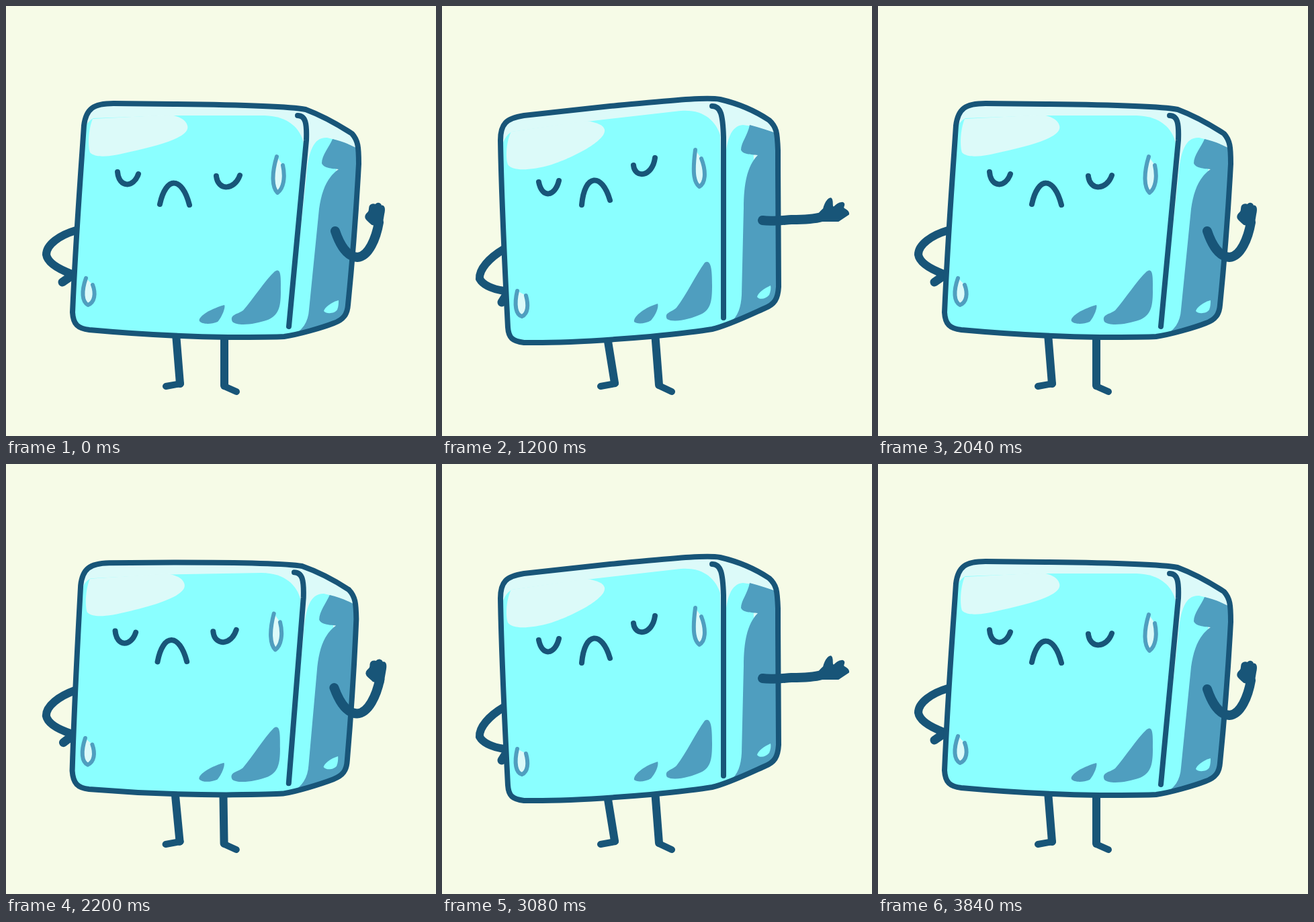
These frames come from a looping animation (640 px wide and 640 px high, 3.88 s). An HTML page:

```html
<!DOCTYPE html>
<html lang="en">
<head>
<meta charset="utf-8">
<title>Sulking ice cube</title>
<style>
  html, body { margin: 0; width: 100%; height: 100%; overflow: hidden; background: #f6fbe7; }
  svg { display: block; width: 100vw; height: 100vh; }
</style>
</head>
<body>
<svg id="stage" viewBox="0 0 640 640">
  <defs><clipPath id="inside"><path id="clipShape"/></clipPath></defs>
</svg>
<script>
const LOOP = 3880, STEP = 40;
const INK = '#185578', ICE = '#8affff', PALE = '#dcfaf9', SHADE = '#4f9ebf';
const MID = 0.77; // lean at which a three-key part reaches its middle key

// Keys run from upright to leaning, with an optional middle key
const BODY = [
  'M99 456 C100 474 107 480 124 482 C190 488 260 492 330 493 C370 493 400 493 414 492 C435 489 470 479 488 472 C502 467 508 459 509 445 C513 405 521 310 525 235 C525 210 524 200 515 190 C495 177 470 163 446 154 C420 149 340 147 250 146 L160 145 C130 145 119 153 116 178 C112 240 104 340 99 456Z',
  'M97 460 C99 482 106 490 122 492 C185 495 250 494 320 490 C355 488 385 487 404 485 C428 480 461 466 484 458 C498 452 503 446 503 428 C505 375 507 295 507 215 C505 196 504 186 492 176 C470 161 444 150 420 144 C395 141 335 144 250 148 L128 156 C101 159 93 169 92 192 C92 250 94 360 97 460Z',
  'M98 478 C99 494 105 499 122 501 C180 502 240 498 310 492 C350 488 385 484 402 481 C425 476 460 459 480 450 C495 444 500 436 501 418 C501 370 500 290 500 215 C499 188 498 180 487 170 C466 156 440 145 414 139 C390 135 330 142 250 149 L122 163 C95 167 87 176 87 200 C88 260 93 380 98 478Z'
];
const ARM = [
  'M490 335 C497 356 508 373 523 374 C540 373 551 345 555 322',
  'M482 325 C492 346 505 362 520 362 C538 362 553 342 562 315',
  'M477 319 C490 321 505 319 520 318 C540 318 555 317 565 314'
];
const FIST = [
  'M545 325 C540 320 533 317 536 311 C539 306 541 308 541 302 C541 294 547 295 550 296 C553 292 558 294 558 298 C563 296 564 302 562 310 L559 328Z',
  'M553 317 C549 310 539 308 540 302 C542 296 546 299 548 296 C546 288 551 285 555 286 C560 281 566 282 567 286 C575 284 575 290 574 300 L570 320Z',
  'M557 320 C557 308 560 307 561 304 C562 302 562 298 564 295 C563 287 569 285 573 288 C578 283 583 284 585 288 C592 286 592 292 592 316 L586 320Z'
];
const OPEN_HAND = 'M557 320 C558 310 564 306 568 302 C571 290 578 283 580 288 C582 294 579 299 583 300 C592 290 600 292 598 297 C594 304 606 302 605 310 L590 320Z';

const stage = document.getElementById('stage');
const clipShape = document.getElementById('clipShape');
const parts = [];

function addPath(attrs) {
  const el = document.createElementNS('http://www.w3.org/2000/svg', 'path');
  for (const name in attrs) el.setAttribute(name, attrs[name]);
  return stage.appendChild(el);
}

const line = (width, color = INK, fill = 'none') => ({
  fill, stroke: color, 'stroke-width': width, 'stroke-linecap': 'round', 'stroke-linejoin': 'round'
});
const filled = fill => ({ fill });
const inside = fill => ({ fill, 'clip-path': 'url(#inside)' });

function part(style, ...keys) {
  parts.push({ el: addPath(style), keys });
}

// Legs settle as soon as the cube reaches its middle pose
function leg(width, upright, leaning) {
  part(line(width), upright, leaning, leaning);
}

// Limbs behind the cube
part(line(12),
  'M104 334 C80 341 60 355 60 370 C62 383 82 393 98 399',
  'M94 350 C74 364 59 380 59 393 C63 406 80 409 94 411',
  'M92 362 C70 375 55 392 56 406 C62 417 80 422 92 424');
part(line(13), 'M97 402 L84 411', 'M96 421 L91 429', 'M94 433 L89 441');
leg(12, 'M253 488 L259 562', 'M246 493 L257 561');
leg(10, 'M260 562 L238 566', 'M258 562 L236 566');
leg(12, 'M325 488 L325 565', 'M317 486 L323 564');
leg(10, 'M325 566 L343 574', 'M323 565 L342 574');

// Cube faces
part(filled(PALE), ...BODY);
part(inside(ICE),
  'M80 500 L112 200 C116 183 120 172 130 167 L247 163 L385 163 C420 164 438 182 443 204 L421 510Z',
  'M80 515 L86 220 C90 202 95 192 104 187 L215 172 L355 156 C388 153 407 170 414 192 L419 500Z');
part(inside(ICE),
  'M419 510 L447 255 C450 215 458 195 478 196 L490 199 L500 510Z',
  'M417 500 L421 240 C422 200 430 178 448 177 L462 179 L475 500Z');
part(inside(SHADE),
  'M486 198 C500 201 512 206 530 216 L520 510 L425 491 C441 484 450 470 451 452 L466 302 C470 274 478 255 495 243 C485 242 472 241 470 234 C470 222 481 210 486 198Z',
  'M465 183 C481 187 494 193 511 200 L508 500 L426 476 C441 468 446 454 448 435 L453 300 C454 265 460 244 476 231 C464 230 452 229 451 222 C451 210 459 195 465 183Z',
  'M458 177 C474 181 488 186 505 192 L506 500 L428 472 C441 462 445 448 446 430 L449 300 C449 260 456 236 470 222 C460 221 447 221 445 214 C445 204 455 192 458 177Z');
part(inside(ICE),
  'M495 438 C484 441 474 449 473 454 C477 459 489 458 493 452 C495 447 495 442 495 438Z',
  'M491 423 C481 427 472 433 471 439 C475 445 484 444 489 438 C491 433 492 428 491 423Z',
  'M489 416 C480 420 470 427 469 433 C473 438 482 436 487 430 C489 425 490 420 489 416Z');
part(inside(PALE),
  'M129 168 C122 185 122 210 125 218 C135 228 160 223 185 217 C230 207 275 195 270 178 C267 168 255 164 245 162Z',
  'M109 181 C102 194 100 219 104 230 C111 240 136 237 166 230 C201 220 251 196 248 181 C246 172 234 169 220 168Z',
  'M103 187 C96 200 94 225 98 236 C105 246 130 245 160 237 C195 226 245 200 242 184 C240 177 230 173 215 171Z');
part(inside(SHADE),
  'M337 470 C332 459 345 459 353 453 C368 436 385 409 400 395 C410 388 409 405 409 425 C409 450 405 460 390 467 C370 474 345 477 337 470Z',
  'M335 466 C330 456 342 456 349 449 C363 431 378 400 391 382 C401 376 402 395 402 415 C402 440 400 452 385 459 C370 466 345 472 335 466Z');
part(inside(SHADE),
  'M288 469 C285 464 300 452 325 445 C327 448 322 462 315 470 C305 474 292 474 288 469Z',
  'M286 470 C284 464 298 450 321 443 C323 448 318 460 311 468 C303 473 290 474 286 470Z');

// Drops
part(line(6, SHADE, PALE),
  'M403 224 C395 250 396 270 404 278 C413 272 416 255 412 237',
  'M382 217 C379 245 380 263 388 270 C397 264 399 245 392 229',
  'M377 214 C373 245 374 262 383 269 C393 263 393 245 386 227');
part(line(6, SHADE, PALE),
  'M119 405 C112 425 113 440 122 445 C132 441 134 428 129 415',
  'M112 424 C107 445 110 460 119 462 C128 458 129 445 125 431');

// Outline, edge and face
part(line(8), ...BODY);
part(line(8),
  'M434 163 C446 163 448 175 447 200 L421 477',
  'M409 154 C423 154 426 167 426 195 L420 468',
  'M402 149 C415 149 418 162 419 195 L419 464');
part(line(8),
  'M166 247 C168 271 190 271 197 250',
  'M149 254 C152 279 172 277 178 253',
  'M144 262 C149 287 168 284 174 260');
part(line(8),
  'M313 253 C315 275 340 275 348 252',
  'M290 235 C292 256 317 253 322 227',
  'M285 237 C287 257 313 255 317 226');
part(line(8),
  'M229 295 C238 253 262 253 273 296',
  'M212 292 C216 246 242 244 254 286',
  'M208 296 C212 249 238 248 250 289');

// Front arm
part(line(14), ...ARM);
const hand = addPath(line(2, INK, INK));

// Blends two paths that share the same commands
function mix(a, b, k) {
  const target = b.match(/-?[\d.]+/g);
  let i = 0;
  return a.replace(/-?[\d.]+/g, n => (+n + (target[i++] - n) * k).toFixed(2));
}

function pose(keys, lean) {
  if (keys.length === 2) return mix(keys[0], keys[1], lean);
  return lean < MID
    ? mix(keys[0], keys[1], lean / MID)
    : mix(keys[1], keys[2], (lean - MID) / (1 - MID));
}

const progress = (t, from, to) => Math.min(1, Math.max(0, (t - from) / (to - from)));
const smooth = x => x * x * (3 - 2 * x);

function leanAt(t) {
  const second = t >= 2000;
  const rise = second ? progress(t, 2120, 2440) : progress(t, 80, 440);
  const fall = second ? progress(t, 3600, 3840) : progress(t, 1600, 1840);
  return fall > 0 ? (1 - fall) ** 1.43 : smooth(rise);
}

// Each entry: start time and how far the hand is open
const GRIP = [
  [0, 0], [560, .5], [600, 1], [760, .5], [840, 0], [1080, .8], [1200, 1], [1640, 0],
  [2640, 1], [2760, .5], [2840, 0], [3080, 1], [3640, 0]
];
const gripAt = t => GRIP.filter(([start]) => start <= t).pop()[1];

function draw(time) {
  const t = Math.floor((time % LOOP) / STEP) * STEP;
  const lean = leanAt(t);
  for (const { el, keys } of parts) el.setAttribute('d', pose(keys, lean));
  clipShape.setAttribute('d', pose(BODY, lean));
  hand.setAttribute('d', mix(pose(FIST, lean), OPEN_HAND, gripAt(t)));
}

const begin = performance.now();
function tick() {
  draw(performance.now() - begin);
  requestAnimationFrame(tick);
}
tick();
</script>
</body>
</html>
```
